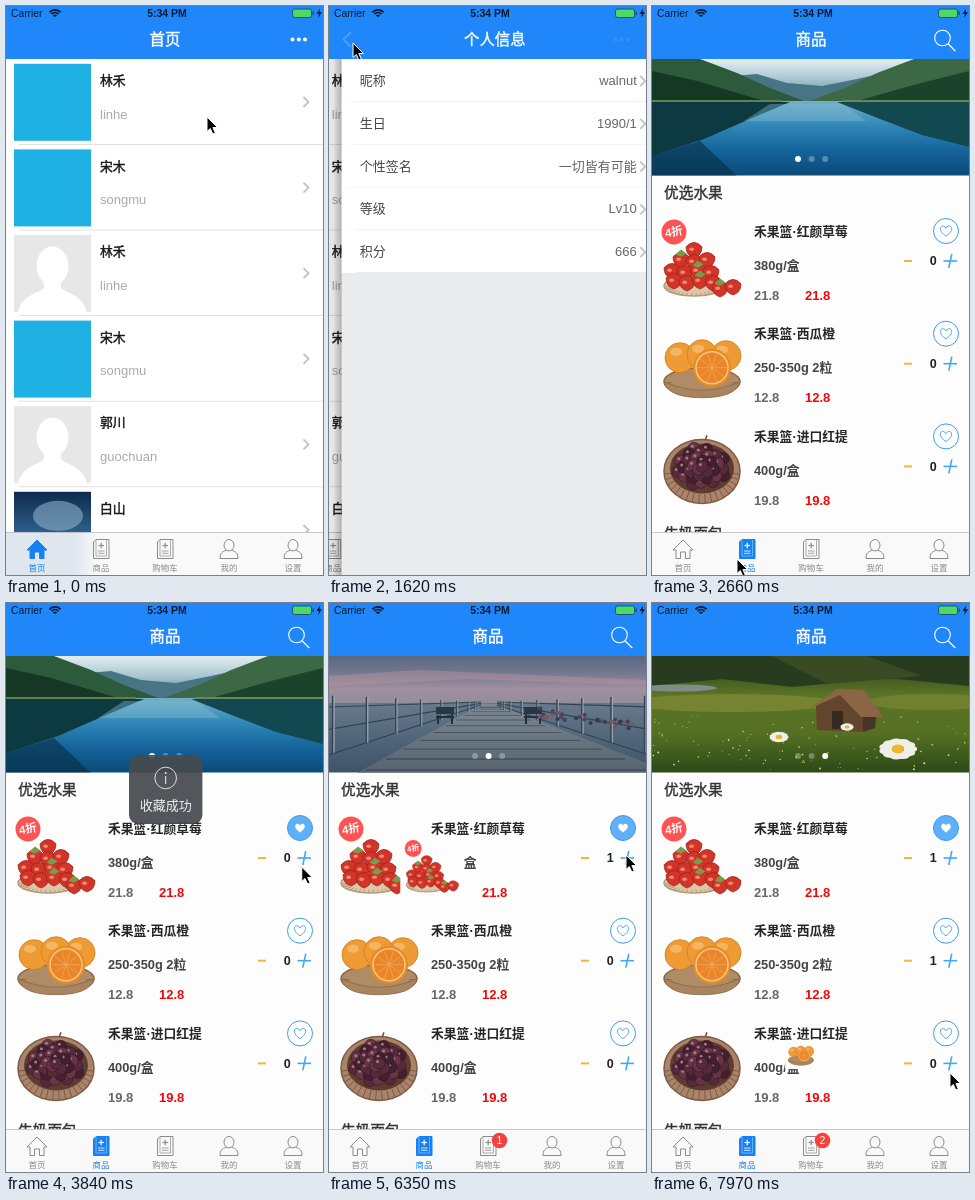
These frames come from a looping animation (317 by 569 pixels, 8 s). An HTML page with a canvas:

```html
<!DOCTYPE html>
<html lang="zh">
<head>
<meta charset="utf-8">
<style>
  html, body { margin: 0; width: 100%; height: 100%; overflow: hidden; background: #fff; }
  canvas { display: block; width: 317px; height: 569px; }
</style>
</head>
<body>
<canvas id="stage"></canvas>
<script>
const W = 317, H = 569, LOOP = 8000, STEP = 147.6;
const NAV = 53, TAB = 526, ROW = 85.6, ITEM = 102.7;
const FONT = '"Liberation Sans", "Noto Sans CJK SC", "Noto Sans CJK", sans-serif';
const BLUE = '#2087fa', TINT = '#1681f3', GREY = '#8b8b8b', PAPER = '#fdfdfd';

const canvas = document.getElementById('stage');
const dpr = window.devicePixelRatio || 1;
canvas.width = W * dpr;
canvas.height = H * dpr;
const c = canvas.getContext('2d');

// ---------- helpers ----------
const clamp = u => Math.max(0, Math.min(1, u));
const easeInOut = u => (1 - Math.cos(Math.PI * clamp(u))) / 2;
const spring = u => u <= 0 ? 0 : 1 - Math.exp(-u) * (1 + u);

function random(seed) {
  return () => (seed = (seed * 16807) % 2147483647) / 2147483647;
}
function group(x, y, fn, scale = 1) {
  c.save();
  c.translate(x, y);
  c.scale(scale, scale);
  fn();
  c.restore();
}
function rect(x, y, w, h, color) {
  c.fillStyle = color;
  c.fillRect(x, y, w, h);
}
function fade(y0, y1, ...colors) {
  const g = c.createLinearGradient(0, y0, 0, y1);
  colors.forEach((color, i) => g.addColorStop(i / (colors.length - 1), color));
  return g;
}
function ellipse(x, y, rx, ry, fill, stroke, width = 1) {
  c.beginPath();
  c.ellipse(x, y, rx, ry, 0, 0, 7);
  paint(fill, stroke, width);
}
const disc = (x, y, r, fill, stroke, width) => ellipse(x, y, r, r, fill, stroke, width);
function paint(fill, stroke, width = 1) {
  if (fill) { c.fillStyle = fill; c.fill(); }
  if (stroke) { c.strokeStyle = stroke; c.lineWidth = width; c.stroke(); }
}
function shape(points, fill, stroke, width) {
  c.beginPath();
  for (let i = 0; i < points.length; i += 2) c.lineTo(points[i], points[i + 1]);
  if (fill) c.closePath();
  paint(fill, stroke, width);
}
const line = (points, color, width) => shape(points, null, color, width);
function path(d, fill, stroke, width = 1) {
  const p = new Path2D(d);
  if (fill) { c.fillStyle = fill; c.fill(p); }
  if (stroke) { c.strokeStyle = stroke; c.lineWidth = width; c.stroke(p); }
}
function text(s, x, y, size, color, align = 'left', weight = 400) {
  c.font = `${weight} ${size}px ${FONT}`;
  c.textAlign = align;
  c.textBaseline = 'middle';
  c.fillStyle = color;
  c.fillText(s, x, y);
}
// A hairline stroke gives a weight between regular and bold.
function mediumText(s, x, y, size, color, align) {
  text(s, x, y, size, color, align);
  c.strokeStyle = color;
  c.lineWidth = .4;
  c.strokeText(s, x, y);
}
const chevron = (x, y) => line([x, y - 5, x + 5, y, x, y + 5], '#c3c3c7', 1.9);

// ---------- bars ----------
function statusBar() {
  text('Carrier', 5, 8, 10.3, '#0b1a2c');
  for (const r of [2, 4.8, 7.6]) {
    c.beginPath();
    c.arc(49, 11.5, r, -Math.PI * .76, -Math.PI * .24);
    paint(null, '#0b1a2c', 1.8);
  }
  text('5:34 PM', 161, 8, 10.5, '#0b1a2c', 'center', 700);
  c.beginPath();
  c.roundRect(286.5, 3, 19, 8.5, 2);
  paint('#4cd964', '#23507c', 1);
  rect(306.5, 5.5, 1.5, 3.5, '#23507c');
  shape([314, 2.5, 310.5, 8, 313, 8, 312, 12, 316, 6.3, 313.5, 6.3], '#0b1a2c');
}
function navTitle(s, x, alpha) {
  c.globalAlpha = alpha;
  mediumText(s, x, 34.8, 15.4, '#fff', 'center');
  c.globalAlpha = 1;
}
function moreDots(alpha) {
  c.globalAlpha = alpha;
  for (const x of [286.5, 292.8, 299]) disc(x, 33.5, 2, '#fff');
  c.globalAlpha = 1;
}

const homeIcon = on => {
  path('M-10 1 L0 -9 L10 1 L7 1 V9.5 H2.5 V3 H-2.5 V9.5 H-7 V1 Z', on && TINT, on ? TINT : GREY);
};
const sheetIcon = on => {
  path('M-5 -9.5 H8 V9.5 H-7.5 V-7 Z', on && TINT, on ? TINT : GREY);
  const ink = on ? '#fff' : GREY;
  line([-5, -9.5, -5, 7, 5.5, 7, 5.5, -9], on ? '#8cc4ff' : GREY, .7);
  line([-2.5, -3.5, 3, -3.5], ink, 1.2);
  line([.2, -6.2, .2, -.8], ink, 1.2);
  line([-3, 2, 3.5, 2], ink, .8);
  line([-3, 4.3, 3.5, 4.3], ink, .8);
};
const personIcon = () => {
  ellipse(0, -3.8, 5, 5.7, null, GREY);
  path('M-2.8 1.2 C-7 3 -9 4 -9 9.5 H9 C9 4 7 3 2.8 1.2', null, GREY);
};
const TABS = [['首页', homeIcon], ['商品', sheetIcon], ['购物车', sheetIcon], ['我的', personIcon], ['设置', personIcon]];

function tabBar(active, badge, glow) {
  rect(0, TAB, W, H - TAB, '#f9f9f9');
  if (glow) {
    const g = c.createLinearGradient(0, 0, 92, 0);
    g.addColorStop(.75, glow);
    g.addColorStop(1, '#f9f9f9');
    rect(0, TAB, 92, H - TAB, g);
  }
  rect(0, TAB, W, .7, '#b4b4b6');
  TABS.forEach(([label, icon], i) => {
    const x = 31 + 64 * i, on = i === active;
    group(x, 543, () => icon(on));
    text(label, x, 563, 8.5, on ? TINT : GREY, 'center');
  });
  if (badge) {
    disc(170.5, 537.5, 7.8, '#f8413c');
    text(badge, 170.5, 538, 10.5, '#fff', 'center');
  }
}

// ---------- home ----------
const tileAvatar = () => rect(0, 0, 77, 77, '#1fb0e4');
const blankAvatar = () => {
  rect(0, 0, 77, 77, '#e7e7e7');
  ellipse(38.5, 31, 16, 19.5, '#fff');
  path('M30 42 V53 C24 59 9 59 4 77 H73 C68 59 53 59 47 53 V42 Z', '#fff');
};
const photoAvatar = () => {
  rect(0, 0, 77, 77, fade(0, 77, '#0d2a4c', '#2c5d88', '#8fabc2'));
  ellipse(44, 24, 25, 15, 'rgba(150,182,208,.55)');
};
const PEOPLE = [
  ['林禾', 'linhe', tileAvatar], ['宋木', 'songmu', tileAvatar],
  ['林禾', 'linhe', blankAvatar], ['宋木', 'songmu', tileAvatar],
  ['郭川', 'guochuan', blankAvatar], ['白山', 'baishan', photoAvatar],
];
function homePage() {
  rect(0, NAV, W, H, '#fff');
  PEOPLE.forEach(([name, account, avatar], i) => {
    const y = NAV + ROW * i;
    group(8, y + 4.8, avatar);
    mediumText(name, 94, y + 22.5, 12.8, '#161616');
    text(account, 94, y + 56, 13, '#aaa');
    chevron(297.5, y + 43);
    rect(13, y + ROW - .6, W, .8, '#d9d9db');
  });
  tabBar(0, 0, '#dfe6ee');
}

// ---------- profile ----------
const FACTS = [['昵称', 'walnut'], ['生日', '1990/1'], ['个性签名', '一切皆有可能'], ['等级', 'Lv10'], ['积分', '666']];
function profilePage() {
  rect(0, NAV, W, H, '#e9ebed');
  FACTS.forEach(([label, value], i) => {
    const y = NAV + 42.8 * i;
    rect(0, y, W, 42.8, '#fff');
    rect(13, y + 42.2, W, .6, '#e3e3e5');
    text(label, 18, y + 22.5, 13, '#444');
    text(value, 295, y + 22.5, 13, '#666', 'right');
    chevron(298.5, y + 22);
  });
}
function navigationScene(t) {
  const p = t < 1400 ? spring((t - 530) / 75) : 1 - spring((t - 1600) / 75);
  const x = W * (1 - p);
  group(-95 * p, 0, homePage);
  if (p > 0) {
    rect(0, NAV, W, H, `rgba(0,0,0,${.1 * p})`);
    const g = c.createLinearGradient(x - 9, 0, x, 0);
    g.addColorStop(0, 'rgba(0,0,0,0)');
    g.addColorStop(1, `rgba(0,0,0,${.25 * p})`);
    rect(x - 9, NAV, 9, H, g);
    group(x, 0, profilePage);
  }
  rect(0, 0, W, NAV, BLUE);
  navTitle('首页', 159 - 120 * p, (1 - p) ** 2);
  moreDots((1 - p) ** .8);
  if (p > 0) {
    navTitle('个人信息', 158.5 + 183 * (1 - p), p);
    c.globalAlpha = p ** 40;
    line([22, 26, 14.5, 33.5, 22, 41], '#fff', 1.8);
    c.globalAlpha = 1;
  }
}

// ---------- banners ----------
function lake() {
  rect(0, 0, W, 50, fade(0, 40, '#e4eef2', '#a9c6d2', '#5f8b8e'));
  shape([70, 18, 105, 15, 135, 24, 170, 27, 205, 20, 250, 10, 250, 46, 70, 46], '#477584');
  shape([0, 0, 48, 0, 85, 14, 118, 29, 152, 42, 0, 44], '#2d5a3a');
  shape([317, 0, 262, 0, 225, 14, 195, 28, 158, 42, 317, 44], '#3c6845');
  shape([0, 12, 45, 22, 112, 42, 0, 44], '#143823');
  shape([317, 12, 265, 25, 205, 42, 317, 44], '#1b432b');
  rect(0, 42, W, 75, fade(42, 117, '#74b0c4', '#2f87b8', '#14639a', '#0b4a78'));
  shape([0, 43, 138, 43, 98, 60, 52, 80, 0, 97], '#0d3a40');
  shape([317, 43, 185, 43, 228, 60, 270, 76, 317, 88], '#124850');
  shape([0, 97, 48, 82, 85, 117, 0, 117], 'rgba(7,45,65,.6)');
  shape([118, 45, 190, 45, 214, 62, 92, 62], 'rgba(126,188,213,.4)');
  rect(0, 41, 130, 2, '#61804d');
  rect(190, 41, 127, 2, '#6a8855');
}
function pier() {
  rect(0, 0, W, 50, fade(0, 50, '#596880', '#747790', '#a28f9f', '#8e8c9b'));
  shape([0, 20, 90, 14, 317, 24, 317, 29, 140, 23, 0, 30], 'rgba(190,151,158,.4)');
  rect(0, 47, W, 70, fade(47, 117, '#66798d', '#3e5368'));
  shape([153, 48, 167, 48, 317, 107, 317, 117, 28, 117], fade(48, 117, '#7d8994', '#55636f'));
  for (let i = 0; i < 12; i++) {
    const y = 51 + i * i * .52;
    line([156 - (y - 48) * 1.8, y, 164 + (y - 48) * 2.4, y], 'rgba(38,51,64,.5)', .6 + i * .08);
  }
  for (const side of [-1, 1]) {
    for (const rise of [0, .4, .75]) {
      line([160 + side * 8, 49 - rise * 4, 160 + side * 160, 99 - rise * 64], '#33424f', 1.2);
    }
    for (let i = 0; i < 9; i++) {
      const d = 12 + i * i * 2.25;
      line([160 + side * d, 50 + d * .3, 160 + side * d, 46 - d * .04], '#34434f', .7 + i * .2);
      line([161 + side * d, 50 + d * .3, 161 + side * d, 46 - d * .04], '#b7c1c9', .4 + i * .08);
    }
    group(160 + side * 44, 59, () => {
      rect(-9, -8, 18, 7, '#2a3640');
      rect(-9, 1, 18, 2, '#222e38');
      rect(-8, 0, 2, 9, '#222e38');
      rect(6, 0, 2, 9, '#222e38');
    });
  }
  const rnd = random(31);
  for (let i = 0; i < 34; i++) {
    const d = 50 + rnd() * 100;
    disc(160 + d, 44 + d * .15 + rnd() * 10, 2, ['#4b4356', '#7d5260', '#2e3f4d'][i % 3]);
  }
}
function daisy(x, y, r) {
  for (let i = 0; i < 11; i++) {
    const a = i * Math.PI * 2 / 11;
    ellipse(x + Math.cos(a) * r * .62, y + Math.sin(a) * r * .36, r * .34, r * .17, '#f0efe6');
  }
  ellipse(x, y, r * .3, r * .22, '#edb829');
}
function meadow() {
  rect(0, 0, W, 117, fade(0, 117, '#263a1b', '#5b7426', '#557022', '#2b4817'));
  shape([0, 0, 317, 0, 317, 30, 235, 22, 140, 31, 70, 23, 0, 30], '#273b1e');
  shape([120, 0, 215, 0, 270, 20, 175, 28], '#3a4a23');
  ellipse(27, 32, 38, 3.5, '#7f8d86');
  ellipse(80, 47, 105, 9, '#768331');
  ellipse(280, 46, 65, 8, '#6f812f');
  const rnd = random(77);
  for (let i = 0; i < 100; i++) {
    const y = 60 + rnd() * 54;
    disc(rnd() * W, y, .4 + y / 190 * rnd(), ['#d9d873', '#b3bd4d', '#dfe0c5'][i % 3]);
  }
  shape([164, 50, 184, 36, 212, 52, 211, 76, 165, 74], '#63452e');
  shape([211, 52, 225, 52, 223, 72, 211, 76], '#483426');
  shape([155, 54, 185, 33, 212, 34, 231, 61, 209, 61, 188, 39], '#8a6546');
  rect(180, 55, 11, 18, '#342a20');
  daisy(127, 81, 10);
  daisy(195, 71, 7);
  daisy(246, 93, 20);
}
const BANNERS = [lake, pier, meadow];
function carousel(t) {
  const slide = start => easeInOut((t - start) / 300);
  const pos = slide(4465) + slide(6465);
  BANNERS.forEach((draw, i) => {
    const x = (i - pos) * W;
    if (Math.abs(x) >= W) return;
    group(x, NAV, () => {
      c.beginPath();
      c.rect(0, 0, W, 116.5);
      c.clip();
      draw();
    });
  });
  for (let i = 0; i < 3; i++) {
    disc(146 + 13.6 * i, 153, 3, i === Math.round(pos) ? '#fff' : 'rgba(255,255,255,.3)');
  }
}

// ---------- fruit, drawn around its own centre ----------
function basket(y, rx, ry, fill, weave) {
  ellipse(0, y, rx, ry, fill, weave, 1.5);
  for (let i = 0; i < 18; i++) {
    const a = Math.PI * (i + .5) / 18;
    const px = Math.cos(a), py = Math.sin(a);
    line([px * rx * .8, y + py * ry * .7, px * rx, y + py * ry], weave, 1);
  }
}
function berry(x, y, r, leafy) {
  path(`M${x - r} ${y - r * .4} Q${x} ${y - r * 1.5} ${x + r} ${y - r * .4} Q${x + r} ${y + r * .7} ${x} ${y + r} Q${x - r} ${y + r * .7} ${x - r} ${y - r * .4}`,
    '#d23428', '#96201c', .7);
  ellipse(x - r * .3, y - r * .1, r * .32, r * .22, '#f08a78');
  if (leafy) shape([x - r * .7, y - r * .7, x, y - r * 1.3, x + r * .7, y - r * .8, x, y - r * .4], '#7c9a4c');
}
function strawberries() {
  group(-8, 0, () => basket(24, 30, 10, '#dcc7a8', '#b59a78'));
  for (const [n, y, x] of [[1, -12, -8], [3, -2, -21], [4, 9, -30], [4, 19, -28]]) {
    for (let i = 0; i < n; i++) berry(x + i * 13, y + (i % 2) * 2, 8, (i + n) % 3 === 0);
  }
  berry(18, 27, 8, true);
  berry(31, 25, 8);
  group(-28, -30, () => {
    disc(0, 0, 12.5, '#fb5452');
    c.rotate(-.17);
    text('4折', 0, .5, 11.5, '#fff', 'center', 700);
  });
}
function oranges() {
  basket(17, 38, 14, '#b08c66', '#8a6747');
  for (const [x, y] of [[-22, -7], [24, -9], [0, -10]]) {
    disc(x, y, 15, '#ee9a35', '#d07d1c', .8);
    ellipse(x - 4, y - 6, 6, 4, '#f6b661');
  }
  path('M-38 17 Q0 34 38 17 Q34 33 0 33 Q-34 33 -38 17', '#a98460', '#8a6747', .8);
  disc(10, 3, 19, '#e98a22');
  disc(10, 3, 16.8, '#f3c587');
  disc(10, 3, 15.2, '#ea8528');
  for (let i = 0; i < 10; i++) {
    const a = i * Math.PI / 5;
    line([10, 3, 10 + Math.cos(a) * 14, 3 + Math.sin(a) * 14], '#f0a85c', .8);
  }
}
function grapes() {
  line([1, -18, 3, -27, 5, -32], '#76523a', 1.6);
  basket(4, 38, 32, '#a9846a', '#7d5a45');
  ellipse(0, 1, 32, 25, '#5f3c30');
  for (let i = 30; i >= 0; i--) {
    const a = i * 2.4, r = Math.sqrt(i / 30);
    const x = Math.cos(a) * r * 25, y = Math.sin(a) * r * 20 - 1;
    disc(x, y, 6, ['#562a3a', '#693546', '#431f2f'][i % 3], '#331622', .6);
    disc(x - 1.5, y - 2, 1.5, '#a37b8a');
  }
}

// ---------- shop ----------
const ITEMS = [
  { name: '禾果篮·红颜草莓', spec: '380g/盒', price: '21.8', draw: strawberries, added: 5950 },
  { name: '禾果篮·西瓜橙', spec: '250-350g 2粒', price: '12.8', draw: oranges, added: 7150 },
  { name: '禾果篮·进口红提', spec: '400g/盒', price: '19.8', draw: grapes, added: Infinity },
];
const itemY = i => 256 + ITEM * i;

function heartButton(x, y, on) {
  disc(x, y, 12.5, on ? '#60b0f8' : '#fff', '#3c9bed', 1);
  group(x, y, () => path('M0 5.5 C-9 -.5 -6 -6 -2.7 -5.2 Q-.8 -4.8 0 -2.8 Q.8 -4.8 2.7 -5.2 C6 -6 9 -.5 0 5.5 Z',
    on ? '#fff' : null, on ? '#fff' : '#3c9bed', .9), on ? .75 : .95);
}
function itemRow(item, i, t) {
  const y = itemY(i);
  group(50, y, item.draw);
  text(item.name, 102, y - 30, 12.8, '#262626', 'left', 700);
  text(item.spec, 102, y + 4, 12.8, '#444', 'left', 700);
  text(item.price, 102, y + 34, 13, '#666', 'left', 700);
  text(item.price, 153, y + 34, 13, '#f00808', 'left', 700);
  heartButton(294, y - 31, i === 0 && t > 3520);
  line([252, y - 1, 260, y - 1], '#f5b53c', 2);
  text(t >= item.added ? 1 : 0, 281.3, y, 12.5, '#222', 'center', 700);
  line([291.5, y - 1, 305, y - 1], '#41a8f3', 1.6);
  line([299.8, y - 8, 296.8, y + 6], '#41a8f3', 1.6);
}
function flyToCart(item, i, t) {
  const u = (t - item.added) / 985;
  if (!(u > 0 && u < 1)) return;
  const y0 = itemY(i);
  const x = 50 + 110 * (1 - (1 - u) ** 1.28);
  const y = y0 + (541 - y0) * u ** 3.7;
  group(x, y, () => {
    rect(-47, -44, 94, 88, PAPER);
    item.draw();
  }, 1 - .8 * u);
}
function toast(t) {
  const shown = clamp((t - 3500) / 150), gone = clamp((t - 5535) / 150);
  const alpha = shown * (1 - gone);
  if (!alpha) return;
  c.globalAlpha = alpha;
  group(159.7, 186.5, () => {
    c.beginPath();
    c.roundRect(-36.7, -34.5, 73.4, 69, 9);
    paint('rgba(70,74,78,.93)');
    disc(0, -11.5, 10.8, null, '#eee', .9);
    disc(0, -16.5, .9, '#eee');
    line([0, -13.5, 0, -5.5], '#eee', 1);
    text('收藏成功', 0, 16.5, 13, '#eee', 'center');
  }, 1 + .3 * (1 - shown));
  c.globalAlpha = 1;
}
function shopScene(t) {
  rect(0, NAV, W, H, PAPER);
  carousel(t);
  mediumText('优选水果', 12, 188, 14.7, '#333');
  ITEMS.forEach((item, i) => itemRow(item, i, t));
  mediumText('牛奶面包', 12, 529, 14.7, '#333');
  tabBar(1, ITEMS.filter(item => t >= item.added).length);
  ITEMS.forEach((item, i) => flyToCart(item, i, t));
  rect(0, 0, W, NAV, BLUE);
  navTitle('商品', 159, 1);
  disc(290.5, 32, 7.8, null, '#fff', 1.1);
  line([296, 37.8, 303.3, 45], '#fff', 1.2);
  toast(t);
}

// ---------- pointer: time, x, y ----------
const POINTER = [
  [0, 201, 111], [290, 282, 27], [950, 282, 27], [1500, 24, 37], [1700, 24, 37],
  [2400, 85, 553], [2680, 85, 553], [2804, 228, 252], [3242, 293, 228], [3550, 293, 228],
  [3900, 296, 267], [4285, 302, 249], [5100, 302, 249], [5160, 297, 252], [6400, 297, 252],
  [6900, 292, 362], [7360, 292, 362], [7970, 298, 470], [LOOP, 298, 470],
];
function pointer(t) {
  const i = POINTER.findIndex(key => key[0] > t);
  const [t0, x0, y0] = POINTER[i - 1], [t1, x1, y1] = POINTER[i];
  const u = easeInOut((t - t0) / (t1 - t0));
  group(x0 + (x1 - x0) * u, y0 + (y1 - y0) * u, () => {
    c.lineJoin = 'round';
    shape([0, 0, 0, 14.5, 3.3, 11.5, 5.8, 17, 8.3, 15.9, 5.9, 10.6, 10.4, 10.4], '#000', '#fff', 1);
  });
}

// The screen refreshes in fixed steps, so motion is sampled on them.
function draw(time) {
  const t = Math.floor((time % LOOP + 3) / STEP) * STEP;
  c.setTransform(dpr, 0, 0, dpr, 0, 0);
  (t < 2465 ? navigationScene : shopScene)(t);
  statusBar();
  pointer(t);
}

const start = performance.now();
function tick() {
  draw(performance.now() - start);
  requestAnimationFrame(tick);
}
tick();
</script>
</body>
</html>
```
